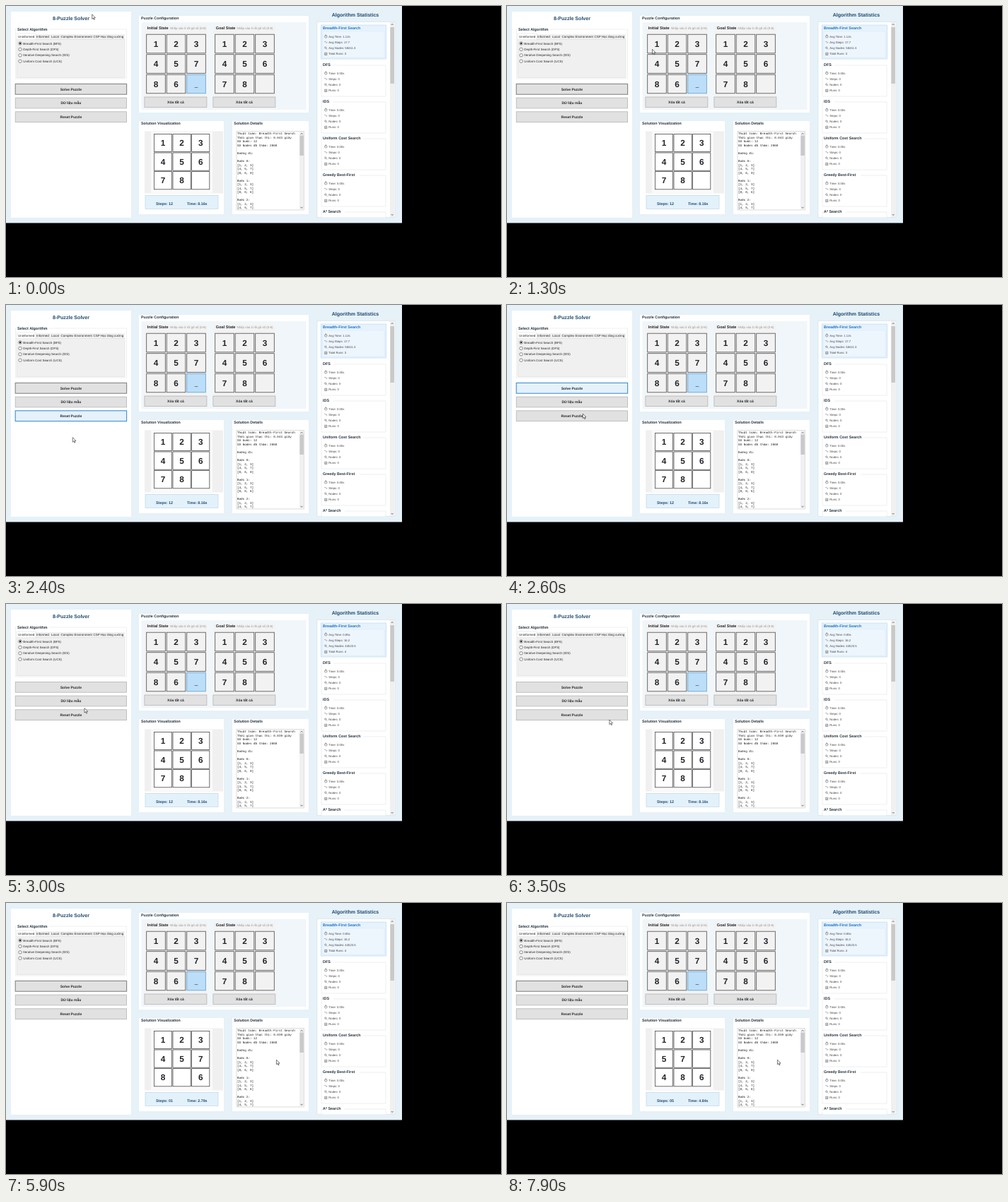
These frames come from a looping animation (700x384 px, 8000 ms). An HTML page:

```html
<!DOCTYPE html>
<html lang="vi">
<head>
<meta charset="utf-8">
<title>8-Puzzle Solver</title>
<style>
  html, body { margin: 0; width: 100%; height: 100%; overflow: hidden; background: #000; }
  svg { display: block; font-family: "Liberation Sans", Arial, sans-serif; text-rendering: geometricPrecision; }
  .mono { font-family: "Liberation Mono", "Courier New", monospace; white-space: pre; }
  .idle rect { fill: #e1e1e1; stroke: #b4b4b4; stroke-width: .8; }
  .focus rect { fill: #e1e1e1; stroke: #858585; stroke-width: 1.1; }
  .hot rect { fill: #e5f1fb; stroke: #3c8fd6; stroke-width: 1.1; }
</style>
</head>
<body>
<svg id="stage" width="700" height="384" viewBox="0 0 700 384"></svg>
<script>
const LOOP = 8000, TICK = 100;
const NAVY = '#1f4a6e', INK = '#20252b';
const stage = document.getElementById('stage');
const parts = [];
const add = s => parts.push(s);

const rect = (x, y, w, h, fill, stroke = 'none', sw = .8) =>
  `<rect x="${x}" y="${y}" width="${w}" height="${h}" fill="${fill}" stroke="${stroke}" stroke-width="${sw}"/>`;

// Text is placed by its vertical middle.
function text(x, y, size, str, { fill = INK, bold, mid, id, cls } = {}) {
  return `<text x="${x}" y="${(y + size * .355).toFixed(2)}" font-size="${size}" fill="${fill}"` +
    (bold ? ' font-weight="700"' : '') + (mid ? ' text-anchor="middle"' : '') +
    (id ? ` id="${id}"` : '') + (cls ? ` class="${cls}"` : '') + `>${str}</text>`;
}

const heading = (x, y, str, fill = '#24323e') => text(x, y, 5.4, str, { fill, bold: true });

function button(x, y, w, h, label, id = '') {
  add(`<g class="idle" id="${id}">${rect(x, y, w, h, '#e1e1e1')}` +
    text(x + w / 2, y + h / 2, 5, label, { bold: true, mid: true }) + '</g>');
}

function grid(x, y, pitch, size, values, fill, prefix) {
  values.forEach((v, i) => {
    const cx = x + i % 3 * pitch, cy = y + Math.floor(i / 3) * pitch;
    const picked = v === '_';
    add(rect(cx, cy, size, size, picked ? '#bcdef8' : fill, picked ? '#5d9fd3' : '#4c4c4c'));
    add(text(cx + size / 2, cy + size / 2 + (picked ? 1 : 0), picked ? 8 : 11.8, v,
      { bold: !picked, mid: true, id: prefix && prefix + i }));
  });
}

function scrollbar(x, y, w, h, thumbY, thumbH) {
  const m = x + w / 2, b = y + h;
  add(rect(x, y, w, h, '#f0f0f0') + rect(x + .4, thumbY, w - .8, thumbH, '#c9c9c9'));
  add(`<path d="M${m - 1.5} ${y + 4}l1.5-1.6 1.5 1.6M${m - 1.5} ${b - 4}l1.5 1.6 1.5-1.6" fill="none" stroke="#555" stroke-width=".8"/>`);
}

function leftPanel() {
  add(rect(7, 8, 170, 292, '#fff'));
  add(text(92, 17, 7.1, '8-Puzzle Solver', { fill: NAVY, bold: true, mid: true }));
  add(rect(13.5, 33, 157, 70, 'none', '#e4e4e4', .6) + rect(15, 31, 46, 5, '#fff'));
  add(heading(16, 33.2, 'Select Algorithm'));
  add(rect(15, 40, 153, 7.5, '#f0f0f0') + rect(15, 47.5, 153, 54, '#f0f0f0', '#dedede', .6));
  add(rect(15, 39, 27, 8.8, '#fff', '#dcdcdc', .5));
  [[17, 'Uninformed'], [43, 'Informed'], [64, 'Local'], [77.5, 'Complex Environment'],
   [123.5, 'CSP'], [133.8, 'Học tăng cường']].forEach(([x, s]) => add(text(x, 43.5, 4.5, s)));
  ['Breadth-First Search (BFS)', 'Depth-First Search (DFS)',
   'Iterative Deepening Search (IDS)', 'Uniform Cost Search (UCS)'].forEach((s, i) => {
    const y = 53 + i * 8.4;
    add(`<circle cx="20" cy="${y}" r="2.2" fill="#fff" stroke="#444" stroke-width=".6"/>`);
    if (!i) add(`<circle cx="20" cy="${y}" r="1.2" fill="#222"/>`);
    add(text(24.3, y, 4.45, s));
  });
  button(13.2, 110.4, 157.4, 14.8, 'Solve Puzzle', 'solve');
  button(13.2, 130.1, 157.4, 14.8, 'Dữ liệu mẫu');
  button(13.2, 149.8, 157.4, 14.8, 'Reset Puzzle', 'reset');
}

function configPanel() {
  add(rect(188, 14, 240, 137, '#fff') + rect(191.5, 23, 233, 124, '#f0f6fa'));
  add(heading(191, 17.5, 'Puzzle Configuration'));
  [[197.5, 'Initial State', '12345786_'], [294.5, 'Goal State', '12345678 ']].forEach(([x, s, v], i) => {
    add(rect(x - 1.5, 27, 88.5, 117, '#f3f3f3'));
    add(text(x + 2.3, 31, 5.6, s, { bold: true }));
    add(text(x + (i ? 32 : 34.5), 31, 4.4, 'Nhấp vào ô rồi gõ số (0-8)', { fill: '#929292' }));
    grid(x + 1.2, 40.2, 28.5, 26.6, [...v], '#f2f2f2');
    button(x - 1.6, 129, 88, 14.4, 'Xóa tất cả');
  });
}

function boardPanel() {
  add(rect(188, 163, 120, 132, '#fff'));
  add(heading(191, 166.5, 'Solution Visualization'));
  add(rect(196, 177.5, 111, 88, '#f0f0f0') + rect(205, 178, 87, 87, '#fafafa'));
  grid(209.4, 181.4, 26.6, 25.2, [...'12345678 '], '#fff', 'cell');
  add(rect(197, 268.4, 103, 19, '#e3f1fb', '#bcd7e8', .7));
  add(text(212, 279.8, 5.4, '', { fill: NAVY, bold: true, id: 'steps' }));
  add(text(256, 279.8, 5.25, '', { fill: NAVY, bold: true, id: 'clock' }));
}

function detailPanel() {
  const rows = ['Thuật toán: Breadth-First Search', '', 'Số bước: 12', 'Số Nodes đã thăm: 2860', '', 'Đường đi:', ''];
  ['[8, 6, 0]', '[8, 0, 6]', ''].forEach((last, i) =>
    rows.push(`Bước ${i}:`, '[1, 2, 3]', '[4, 5, 7]', last, ''));
  add(rect(320, 163, 108, 132, '#fff'));
  add(heading(322.3, 166.5, 'Solution Details'));
  add(rect(326, 177.5, 95.5, 111.5, '#fff', '#c4c4c4', .6));
  rows.forEach((s, i) => {
    if (s || i === 1) add(text(327, 180.9 + i * 5.52, 4.27, s, { cls: 'mono', fill: '#111', id: i === 1 ? 'took' : '' }));
  });
  scrollbar(415, 177.8, 6.2, 111, 183.5, 28.5);
}

function icon(kind, x, y) {
  const shape = [
    `<circle cx="${x}" cy="${y + .3}" r="1.8"/><path d="M${x} ${y + .3}v-1.2M${x - .7} ${y - 2.1}h1.4"/>`,
    `<path d="M${x - 1.4} ${y - 1.4}v1.2M${x + .6} ${y}v1.4M${x - .5} ${y - 1.2}l.4 1M${x + 1.5} ${y}l.2 1"/>`,
    `<circle cx="${x - .5}" cy="${y - .5}" r="1.2"/><path d="M${x + .4} ${y + .4}l1.5 1.5"/>`,
    `<path d="M${x - 1.6} ${y - 1.7}h3.2v3.4h-3.2zM${x - .6} ${y + 1}v-1.4M${x + .6} ${y + 1}v-2"/>`
  ][kind];
  return `<g fill="none" stroke="#666" stroke-width=".6">${shape}</g>`;
}

function statsPanel() {
  add(text(494, 12.3, 7.05, 'Algorithm Statistics', { fill: NAVY, bold: true, mid: true }));
  add(rect(440, 22.5, 110, 277, '#fff', '#d5dfe6', .6));
  add('<clipPath id="clip"><rect x="440" y="22" width="103" height="277.5"/></clipPath><g clip-path="url(#clip)">');
  ['Breadth-First Search', 'DFS', 'IDS', 'Uniform Cost Search', 'Greedy Best-First', 'A* Search'].forEach((name, n) => {
    const y = 31 + n * 52, first = !n;
    if (first) add(rect(445.5, 27, 92, 48, '#e6f2fc', '#b9d9f2', .7));
    else add(rect(446, y + 1, 91, 44, '#fff', '#dfe3e6', .6) + rect(447, y - 3, 8 + name.length * 2.65, 6, '#fff'));
    if (first) add(rect(448, 36, 87, 37, '#eef6fd', '#d5e7f5', .5));
    add(heading(448, y, name, first ? '#1b71c4' : '#24323e'));
    ['Time: 0.00s', 'Steps: 0', 'Nodes: 0', 'Runs: 0'].forEach((s, i) => {
      const ry = y + 12 + i * 8.3;
      add(icon(i, 452.3, ry));
      add(text(456.3, ry, 4.25, s, { fill: '#444', id: first ? 'stat' + i : '' }));
    });
  });
  add('</g>');
  scrollbar(543, 23, 6.4, 276, 30, 80);
}

add(rect(0, 0, 560, 307.5, '#e6f1f8'));
leftPanel();
configPanel();
boardPanel();
detailPanel();
statsPanel();
add('<path id="cursor" d="M0 0V6.6L1.6 5.2 2.7 7.7 3.7 7.2 2.6 4.9H4.7Z" fill="#fff" stroke="#222" stroke-width=".6"/>');
stage.innerHTML = parts.join('');

const $ = id => document.getElementById(id);
const put = (id, s) => { if ($(id).textContent !== s) $(id).textContent = s; };

// [time, x, y] of the pointer tip
const path = [
  [0, 121.7, 11.8], [400, 121.7, 11.8], [700, 172, 41], [900, 206, 62], [1200, 206, 62],
  [1400, 205, 60.5], [1500, 205, 60.5], [1700, 215, 57], [1800, 215, 57], [1900, 155, 149],
  [2100, 154.2, 150], [2400, 94.2, 187.6], [2600, 107.2, 154], [2800, 111, 147.5],
  [3400, 111, 147.5], [3500, 144.8, 164], [3800, 262, 196], [4100, 360, 219], [4300, 382.4, 222.2]
];
const solveLook = [[0, 'focus'], [1900, 'hot'], [2300, 'focus'], [2600, 'hot'], [3000, 'idle'], [4400, 'focus']];
const resetLook = [[0, 'idle'], [2300, 'hot'], [2600, 'idle']];
const stats = [
  [0, ['Avg Time: 1.12s', 'Avg Steps: 17.7', 'Avg Nodes: 58411.3', 'Total Runs: 3', '0.043']],
  [3000, ['Avg Time: 0.85s', 'Avg Steps: 16.2', 'Avg Nodes: 44523.5', 'Total Runs: 4', '0.039']]
];
const board = [
  [0, ['12345678 ', '12', '8.16']], [4400, ['12345786 ', '00', '0.00']],
  [5400, ['12345786 ', '00', '2.27']], [5900, ['1234578 6', '01', '2.79']],
  [6400, ['123457 86', '02', '3.30']], [6900, ['123 57486', '03', '3.81']],
  [7400, ['1235 7486', '04', '4.33']], [7900, ['12357 486', '05', '4.84']]
];

const at = (steps, t) => steps.filter(s => s[0] <= t).pop()[1];

function pointer(t) {
  const i = path.findIndex(p => p[0] > t);
  if (i < 0) return path[path.length - 1].slice(1);
  const [t0, x0, y0] = path[i - 1], [t1, x1, y1] = path[i];
  const k = (t - t0) / (t1 - t0);
  return [x0 + (x1 - x0) * k, y0 + (y1 - y0) * k];
}

function draw(t) {
  $('cursor').setAttribute('transform', `translate(${pointer(t)})`);
  $('solve').setAttribute('class', at(solveLook, t));
  $('reset').setAttribute('class', at(resetLook, t));
  const info = at(stats, t);
  for (let i = 0; i < 4; i++) put('stat' + i, info[i]);
  put('took', `Thời gian thực thi: ${info[4]} giây`);
  const [cells, steps, secs] = at(board, t);
  [...cells].forEach((c, i) => put('cell' + i, c));
  put('steps', 'Steps: ' + steps);
  put('clock', `Time: ${secs}s`);
}

const start = performance.now();
function frame() {
  const t = (performance.now() - start) % LOOP;
  draw(Math.floor(t / TICK) * TICK);
  requestAnimationFrame(frame);
}
frame();
</script>
</body>
</html>
```
